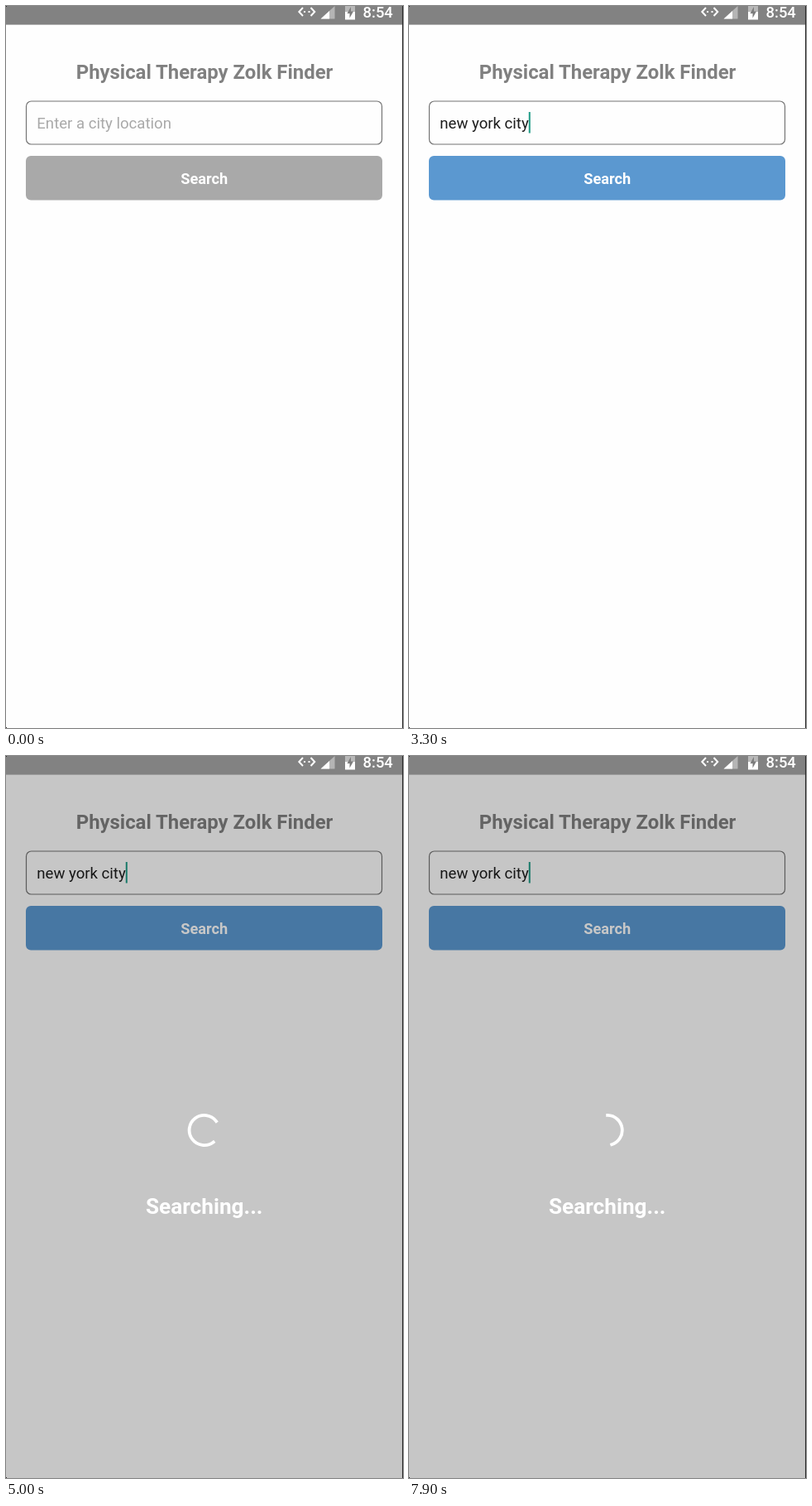
Write an HTML page that moves like this. It is 480 px wide and 872 px high and loops after 8000 ms.

```html
<!DOCTYPE html>
<html lang="en">
<head>
<meta charset="utf-8">
<title>Finder</title>
<style>
  html, body { margin: 0; width: 100%; height: 100%; overflow: hidden; background: #fefefe; }
  svg { display: block; width: 480px; height: 872px; }
  text { font-family: Roboto, sans-serif; font-size: 18.6px; white-space: pre; }
  .bold { font-weight: 700; text-anchor: middle; }
</style>
</head>
<body>
<svg viewBox="0 0 480 872">
  <rect width="480" height="872" fill="#fefefe"/>

  <text class="bold" x="240" y="88" style="font-size:23.9px" fill="#808080">Physical Therapy Zolk Finder</text>
  <rect x="24.5" y="115" width="430" height="52" rx="6" fill="#fefefe" stroke="#757575" stroke-width="1.2"/>
  <text id="hint" x="37.3" y="148" fill="#a9a9a9">Enter a city location</text>
  <text id="typed" x="37.3" y="148" fill="#1c1c1c"></text>
  <rect id="caret" y="128" width="2" height="25.5" fill="#1f9b86"/>

  <g id="button">
    <rect id="face" x="24" y="181" width="431" height="53.5" rx="6"/>
    <text class="bold" x="239.7" y="215" style="font-size:18.2px" fill="#fff">Search</text>
  </g>

  <g id="modal">
    <rect y="22" width="480" height="850" fill="#000" fill-opacity=".22"/>
    <path id="arc" fill="none" stroke="#fff" stroke-width="3.8" stroke-linecap="square"/>
    <text class="bold" x="239.7" y="553" style="font-size:26.2px" fill="#fff">Searching...</text>
  </g>

  <g id="status">
    <rect width="480" height="22.6" fill="#828282"/>
    <path d="M359 2 354.3 7 359 12M368.5 2 373.2 7 368.5 12" fill="none" stroke="#fff" stroke-width="2"/>
    <path d="M360 6h2v2h-2zM365.5 6h2v2h-2z" fill="#fff"/>
    <path d="M380.5 15.5 397.5 0V15.5z" fill="#b5b5b5"/>
    <path d="M380.5 15.5 391 6V15.5z" fill="#fff"/>
    <path d="M410 0h12v8h-12z" fill="#b8b8b8"/>
    <path d="M410 7h12v9.5h-12z" fill="#fff"/>
    <path d="M417 1 412.5 9H415.5V14.5L420 6.5H417z" fill="#7c7c7c"/>
    <text x="431.6" y="14.3" style="font-size:18.4px;font-weight:500" fill="#fff">8:54</text>
  </g>
  <path d="M479 0h1v872h-1zM0 0h1v1H0zM0 871h1v1H0z" fill="#2b2b2b"/>
</svg>

<script>
const LOOP = 8000, TICK = 100;
const QUERY = "new york city";
const FOCUS = 1000, TYPE = 1900, KEY_GAP = 105, BLINK = 500;
const LAST_KEY = TYPE + KEY_GAP * (QUERY.length - 1);
const PRESS = 4200, RELEASE = 4400, OPEN = 4500;

const $ = id => document.getElementById(id);
const [hint, typed, caret, button, face, modal, arc] =
  ["hint", "typed", "caret", "button", "face", "modal", "arc"].map($);
const clamp = v => Math.min(1, Math.max(0, v));
const show = (el, on) => el.setAttribute("visibility", on ? "visible" : "hidden");

// y of a cubic curve from (0,0) to (1,1) at a given x
function bezier(x1, y1, x2, y2, x) {
  const at = (a, b, u) => 3 * a * u * (1 - u) ** 2 + 3 * b * u * u * (1 - u) + u ** 3;
  let lo = 0, hi = 1;
  for (let i = 0; i < 24; i++) {
    const mid = (lo + hi) / 2;
    if (at(x1, x2, mid) < x) lo = mid; else hi = mid;
  }
  return at(y1, y2, lo);
}

function drawInput(t) {
  const count = t < TYPE ? 0 : Math.min(QUERY.length, 1 + Math.floor((t - TYPE) / KEY_GAP));
  typed.textContent = QUERY.slice(0, count);
  show(hint, !count);
  face.setAttribute("fill", count ? "#5b98d0" : "#a9a9a9");
  caret.setAttribute("x", 37.3 + (count ? typed.getComputedTextLength() : 0));

  const typing = t >= TYPE && t < LAST_KEY;
  const since = t - (t < TYPE ? FOCUS : LAST_KEY);
  const lit = Math.floor(since / BLINK) % 2 === 0;
  show(caret, t >= FOCUS && (typing || t >= OPEN || lit));
}

function drawButton(t) {
  const down = clamp((t - PRESS) / 150);
  const up = 1 - (1 - clamp((t - RELEASE) / 220)) ** 2.4;
  button.setAttribute("opacity", 1 - 0.81 * down * (1 - up));
}

// Material spinner: the head runs ahead, then the tail catches up
function drawSpinner(t) {
  const CYCLE = 1333, R = 18.1, CX = 239.7, CY = 452;
  const lag = 45 * Math.exp((OPEN - t) / 200);
  const time = t - 4358 - lag;
  const phase = time % CYCLE / CYCLE;
  const head = 270 * bezier(.4, 0, .2, 1, clamp(phase * 2));
  const tail = 270 * bezier(.4, 0, .2, 1, clamp(phase * 2 - 1));
  const base = time * .156 + phase * 90;
  const point = deg => {
    const a = deg * Math.PI / 180;
    return `${(CX + R * Math.sin(a)).toFixed(2)} ${(CY - R * Math.cos(a)).toFixed(2)}`;
  };
  const large = head - tail > 180 ? 1 : 0;
  arc.setAttribute("d", `M${point(base + tail)}A${R} ${R} 0 ${large} 1 ${point(base + head + .5)}`);
}

function render(t) {
  drawInput(t);
  drawButton(t);
  show(modal, t >= OPEN);
  if (t >= OPEN) drawSpinner(t);
}

let start;
function frame(now) {
  start ??= now;
  const t = (now - start) % LOOP;
  render(Math.floor(t / TICK) * TICK);
  requestAnimationFrame(frame);
}
render(0);
requestAnimationFrame(frame);
</script>
</body>
</html>
```
